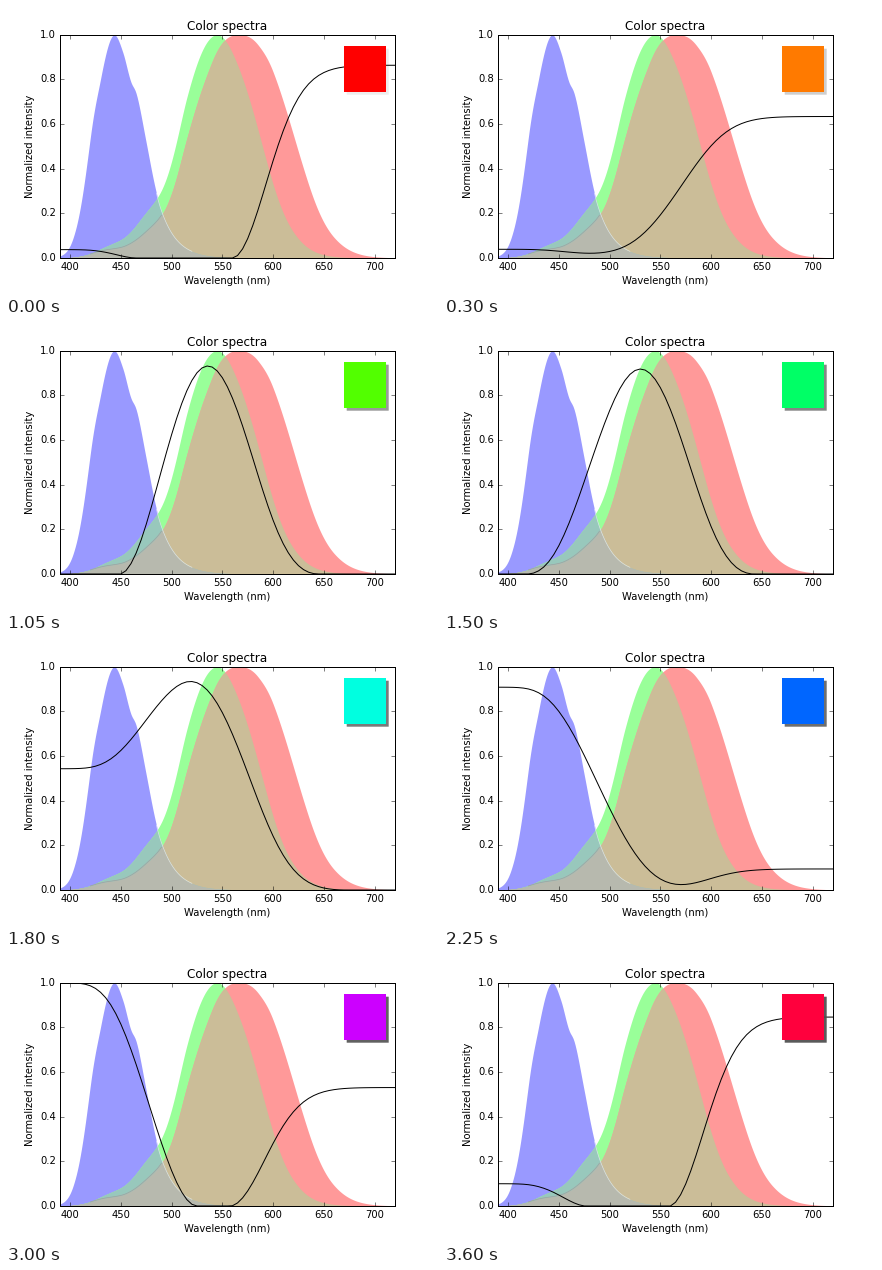
Recreate the animation shown at these times as a matplotlib script. Size 432 by 288 pixels, loop 3.75 s.

```python
import colorsys

import matplotlib.pyplot as plt
import numpy as np
from matplotlib.animation import FuncAnimation
from matplotlib.patches import Rectangle

W, H, DPI = 432, 288, 72
FRAMES, STEP_MS = 25, 150

plt.style.use("classic")
plt.rcParams.update({
    "font.family": "DejaVu Sans", "font.size": 10,
    "axes.titlesize": 12, "axes.labelsize": 10,
    "xtick.labelsize": 10, "ytick.labelsize": 10,
    "figure.facecolor": "white", "savefig.facecolor": "white",
    "savefig.dpi": DPI,
})

# Key points of each eye sensitivity: wavelength in nm, height
LONG = [(390, 0.0004), (400, 0.0024), (420, 0.0184), (455, 0.055),
        (475, 0.119), (490, 0.192), (515, 0.536), (540, 0.881), (570, 1),
        (585, 0.956), (600, 0.834), (630, 0.401), (660, 0.093), (720, 0.0014)]
MID = [(390, 0.0004), (405, 0.0047), (425, 0.03), (455, 0.098), (470, 0.176),
       (490, 0.304), (515, 0.719), (543, 1), (560, 0.918), (590, 0.493),
       (620, 0.117), (660, 0.0073), (720, 0.0001)]
SHORT = [(390, 0.0096), (405, 0.122), (420, 0.544), (430, 0.803), (443, 1),
         (452, 0.92), (460, 0.787), (465, 0.738), (475, 0.516), (490, 0.212),
         (520, 0.03), (560, 0.002), (720, 1e-8)]

# Cone responses to linear red, green and blue light
RESPONSE = np.array([[0.2065, 0.518, 0.0445],
                     [0.0750, 0.652, 0.0755],
                     [0.0145, 0.088, 0.748]])


def cone(points, at):
    """Cubic Hermite curve through the logarithms of the key points."""
    x, y = np.array(points).T
    y = np.log(y)
    slope = np.gradient(y, x)
    k = np.clip(np.searchsorted(x, at, side="right") - 1, 0, len(x) - 2)
    gap = x[k + 1] - x[k]
    t = (at - x[k]) / gap
    ease = t * t * (3 - 2 * t)
    bend = t * (1 - t) * ((1 - t) * slope[k] - t * slope[k + 1]) * gap
    return np.exp(y[k] + ease * (y[k + 1] - y[k]) + bend)


def linear(c):
    return c / 12.92 if c <= 0.04045 else ((c + 0.055) / 1.055) ** 2.4


def smoothest(cones, targets, rounds=6000, weight=0.05):
    """Flattest spectra within 0..1 that give the wanted responses (ADMM)."""
    n = cones.shape[1]
    cones = cones / cones.sum(axis=1, keepdims=True)
    diff = np.diff(np.eye(n), axis=0)
    kkt = np.zeros((n + 3, n + 3))
    kkt[:n, :n] = diff.T @ diff + weight * np.eye(n)
    kkt[:n, n:], kkt[n:, :n] = cones.T, cones
    inv = np.linalg.inv(kkt)
    fixed, gain = inv[:n, n:] @ targets, weight * inv[:n, :n]
    z = np.full((n, targets.shape[1]), 0.5)
    u = np.zeros_like(z)
    for _ in range(rounds):
        x = fixed + gain @ (z - u)
        z = np.clip(x + u, 0, 1)
        u += x - z
    return z.T


wave = np.arange(390, 721, 5)
fine = np.arange(390, 721)
cones = np.array([cone(p, wave) for p in (LONG, MID, SHORT)])
long_, mid, short = (cone(p, fine) for p in (LONG, MID, SHORT))

colors = [colorsys.hsv_to_rgb(i / FRAMES, 1, 1) for i in range(FRAMES)]
light = np.array([[linear(c) for c in rgb] for rgb in colors]).T
spectra = smoothest(cones, RESPONSE @ light)

fig = plt.figure(figsize=(W / DPI, H / DPI), dpi=DPI)
ax = fig.add_axes([0.125, 0.125, 0.775, 0.775])


def area(color, *curves):
    ax.fill_between(fine, 0, np.minimum.reduce(curves), color=color, lw=0)


def seam(curve, start, end, color, alpha):
    part = (fine >= start) & (fine <= end)
    ax.plot(fine[part], curve[part], color=color, lw=0.7, alpha=alpha)


area("#9999ff", short)
area("#99ff99", mid)
area("#ff9999", long_)
area("#cbbd98", long_, mid)
area("#98c8bc", short, mid)
area("#b7b9ae", short, mid, long_)

# Faint lines where the areas meet
seam(long_, 420, 490, "#a0a0a0", 1)
seam(short, 485, 520, "white", 0.6)

line, = ax.plot(wave, spectra[0], color="black", lw=1)
ax.set(xlim=(390, 720), ylim=(0, 1), title="Color spectra",
       ylabel="Normalized intensity")
ax.set_xlabel("Wavelength (nm)", labelpad=4)


def box(x, y, zorder):
    patch = Rectangle((x, H - y - 46), 42, 46, lw=0, zorder=zorder,
                      transform=None, clip_on=False, snap=False)
    return fig.add_artist(patch)


shadow = box(340.7, 42.7, 4)
swatch = box(338, 40, 5)


def draw(i):
    line.set_ydata(spectra[i])
    swatch.set_facecolor(colors[i])
    # The shadow deepens with every step of the loop
    shadow.set_facecolor((0.3, 0.3, 0.3, 1 - 0.9 ** (i + 1)))
    return line, shadow, swatch


anim = FuncAnimation(fig, draw, frames=FRAMES, interval=STEP_MS,
                     init_func=lambda: draw(0), repeat=True, repeat_delay=0)
plt.show()
```
